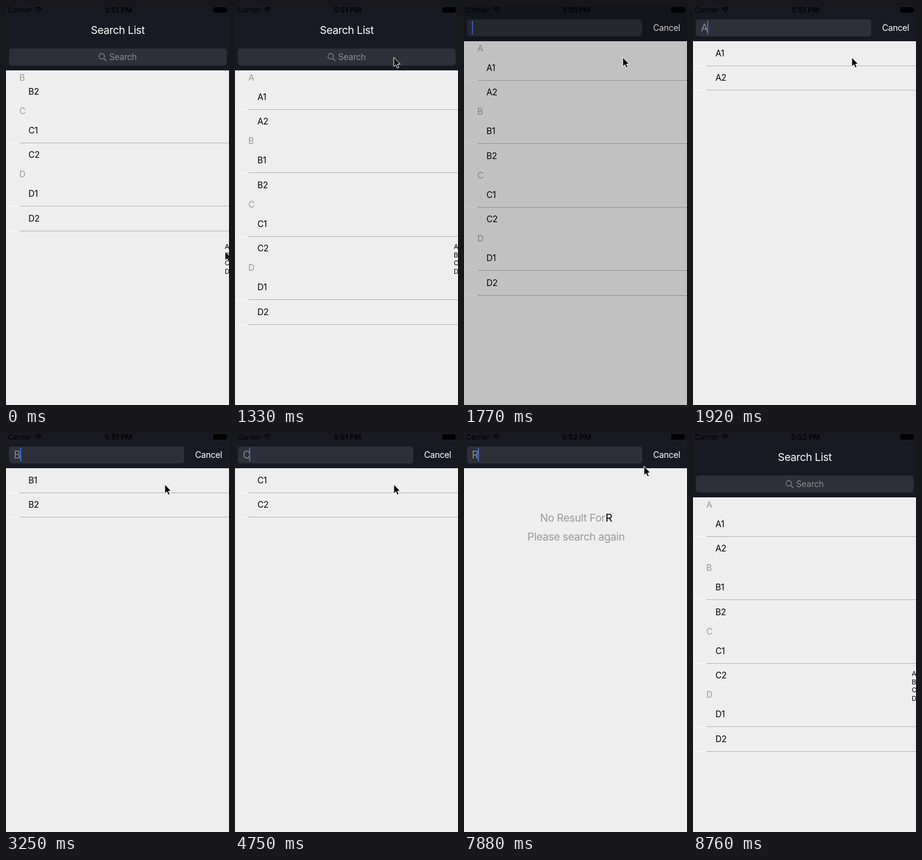
Animation, 368 px wide and 657 px high, one loop 9.51 s. Source, as an HTML page:

```html
<!DOCTYPE html>
<html lang="en">
<head>
<meta charset="utf-8">
<title>Search List</title>
<style>
html, body { margin: 0; width: 100%; height: 100%; overflow: hidden; background: #eee; }
svg { display: block; width: 368px; height: 657px; }
text { font: 14.2px Inter, "Liberation Sans", sans-serif; letter-spacing: -.3px; white-space: pre; }
.head text { fill: #999; }
.big { font-size: 17.6px; letter-spacing: -.33px; text-anchor: middle; }
.index text { font-size: 11px; letter-spacing: 0; }
.status text { font-size: 12px; letter-spacing: 0; }
.status .clock { font-weight: 600; text-anchor: middle; }
#query { font-size: 16.8px; fill: #8d8e92; }
</style>
</head>
<body>
<svg viewBox="0 0 368 657" xmlns="http://www.w3.org/2000/svg">
  <rect width="368" height="657" fill="#eee"/>
  <g id="list"></g>
  <g id="results"></g>
  <g id="empty">
    <text class="big" x="185" y="145.5" fill="#999">No Result For<tspan id="missing" fill="#000"></tspan></text>
    <text class="big" x="185" y="177" fill="#999">Please search again</text>
  </g>
  <g id="index" class="index"></g>

  <rect id="nav" width="368" height="106" fill="#171a23"/>
  <text id="title" class="big" x="184.5" y="46" fill="#fff">Search List</text>
  <g id="bar">
    <rect id="field" x="5" y="70" width="359" height="28" rx="4.5" fill="#2d3038"/>
    <g id="hint">
      <g fill="none" stroke="#8d8e92" stroke-width="1.2" stroke-linecap="round">
        <circle cx="158" cy="82.8" r="4.5"/>
        <path d="M161.3 86.2L165.5 90.2"/>
      </g>
      <text x="170.3" y="89.2" fill="#8d8e92">Search</text>
    </g>
    <text id="query" x="13" y="90"></text>
    <rect id="caret" y="72.5" width="2" height="22" fill="#4468e0"/>
    <text id="cancel" y="89" fill="#fff">Cancel</text>
  </g>
  <rect id="dim" width="368" height="657"/>

  <g class="status">
    <text x="3" y="10.5">Carrier</text>
    <g fill="none" stroke="#000" stroke-width="1.5">
      <path d="M48 4.6Q53.5 .4 59 4.6M50 7Q53.5 4.4 57 7"/>
      <path d="M53.5 10.8L51.8 8.8Q53.5 7.6 55.2 8.8Z" fill="#000" stroke="none"/>
    </g>
    <text id="clock" class="clock" x="185.6" y="10.5"></text>
    <rect x="342" y="2" width="22" height="9" rx="1.5"/>
    <rect x="364.8" y="4.7" width="1.4" height="3.6" rx=".7"/>
  </g>
  <path id="cursor" d="M0 0V15.3L3.5 12.1L5.8 17.5L8.4 16.4L6.2 11.2H10.8Z" stroke="#fff" stroke-width="1" stroke-linejoin="round"/>
</svg>
<script>
const $ = id => document.getElementById(id);
const LOOP = 9510, SECTION = 104.4, HEAD = 23.6, ROW = 40.4;
const letters = ["A", "B", "C", "D"];

function group(parent, markup, cls = "") {
  const g = document.createElementNS("http://www.w3.org/2000/svg", "g");
  g.setAttribute("class", cls);
  g.innerHTML = markup;
  parent.append(g);
  return g;
}

function row(parent, label, line) {
  const rule = '<rect width="22" height="1" fill="#f9f9f9"/><rect x="22" width="346" height="1" fill="#b4b4b4"/>';
  return group(parent, `<text x="37" y="-15">${label}</text>${line ? rule : ""}`);
}

const move = (el, x, y) => el.setAttribute("transform", `translate(${x} ${y})`);
const show = (el, on) => el.setAttribute("visibility", on ? "visible" : "hidden");
const fade = (el, v) => el.setAttribute("opacity", v);

const rows = letters.map(c => [row($("list"), c + 1, true), row($("list"), c + 2, c === "D")]);
const heads = letters.map(c =>
  group($("list"), `<rect width="368" height="${HEAD}" fill="#eee"/><text x="22" y="17">${c}</text>`, "head"));
const found = [row($("results"), "", true), row($("results"), "", true)];
letters.forEach((c, i) => {
  $("index").innerHTML += `<text x="361" y="${400.4 + i * 13.4}">${c}</text>`;
});

// Each step keeps the earlier values and replaces only those listed.
const steps = [
  [0, { scroll: 154, open: 0, dim: 0, q: "", caret: 0, clock: "5:51 PM", at: [361.5, 404] }],
  [300, { scroll: 0, at: [361.5, 399] }],
  [445, { at: [361.5, 395] }],
  [590, { at: [361, 392] }],
  [890, { at: [352, 372] }],
  [1040, { at: [322, 282] }],
  [1180, { at: [283, 150] }],
  [1330, { at: [262, 84.5] }],
  [1470, { open: .15, dim: .03 }],
  [1620, { open: .75, dim: .12 }],
  [1770, { open: 1, dim: .19, caret: 1 }],
  [1920, { dim: 0, q: "A" }],
  [2520, { caret: .5 }],
  [2660, { caret: 0 }],
  [2960, { q: "", caret: 1 }],
  [3250, { q: "B" }],
  [3700, { caret: .5 }],
  [3850, { caret: 0 }],
  [4150, { caret: .5 }],
  [4300, { caret: 1 }],
  [4450, { q: "" }],
  [4750, { q: "C" }],
  [5340, { caret: .5 }],
  [5490, { caret: 0 }],
  [5790, { caret: 1 }],
  [6230, { q: "" }],
  [6530, { q: "R" }],
  [6680, { clock: "5:52 PM" }],
  [7130, { caret: .5 }],
  [7280, { caret: 0 }],
  [7580, { caret: 1, at: [268, 80] }],
  [7730, { at: [281, 69] }],
  [7880, { at: [297, 54.5] }],
  [8020, { at: [314, 45] }],
  [8170, { at: [328, 38] }],
  [8320, { at: [331, 36] }],
  [8460, { q: "", caret: 0 }],
  [8610, { open: .44, at: null }],
  [8760, { open: 0 }]
];
let last = {};
const states = steps.map(([t, change]) => last = { ...last, ...change, t });

function draw(s) {
  const top = 106 - 48 * s.open, lift = -48 * s.open;
  const hit = letters.includes(s.q), browsing = s.q === "";

  show($("list"), browsing);
  show($("results"), hit);
  show($("empty"), !browsing && !hit);
  show($("index"), browsing && s.dim === 0);
  move($("index"), 0, -53 * s.open);

  letters.forEach((c, i) => {
    const y = top + SECTION * i - s.scroll;
    const pinned = Math.min(Math.max(y, top), y + SECTION - HEAD);
    move(heads[i], 0, pinned);
    rows[i].forEach((r, j) => move(r, 0, Math.round(y + HEAD + ROW * (j + 1))));
  });
  found.forEach((r, j) => {
    r.querySelector("text").textContent = s.q + (j + 1);
    move(r, 0, 98 + 40 * j);
  });
  $("missing").textContent = s.q;

  $("nav").setAttribute("height", top);
  move($("title"), 0, lift);
  fade($("title"), 1 - s.open);
  move($("bar"), 0, lift);
  $("field").setAttribute("width", 359 - 70 * s.open);
  move($("hint"), -140 * s.open, 0);
  fade($("hint"), 1 - s.open);
  $("cancel").setAttribute("x", 312 + 64 * (1 - s.open));
  fade($("cancel"), s.open);

  $("query").textContent = s.q;
  $("caret").setAttribute("x", browsing ? 13 : s.q === "R" ? 22.6 : 23.2);
  fade($("caret"), s.caret);
  fade($("dim"), s.dim);
  $("clock").textContent = s.clock;
  show($("cursor"), s.at);
  if (s.at) move($("cursor"), ...s.at);
}

const start = performance.now();
let shown;
function tick() {
  const t = (performance.now() - start) % LOOP;
  const s = states.findLast(k => k.t <= t) || states[0];
  if (s !== shown) draw(shown = s);
  requestAnimationFrame(tick);
}
tick();
</script>
</body>
</html>
```
